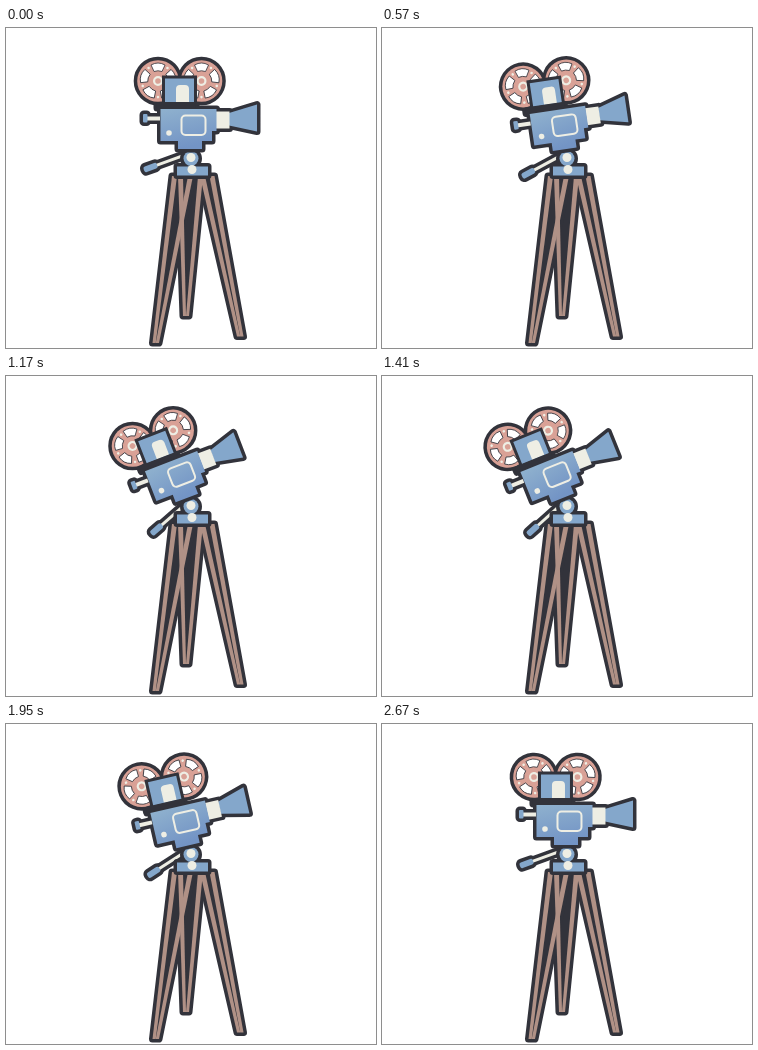
These frames come from a looping animation (370 px wide and 320 px high, 2.7 s). An HTML page:

```html
<!DOCTYPE html>
<html lang="en">
<head>
<meta charset="utf-8">
<title>Film camera</title>
<style>
  html, body { margin: 0; width: 100%; height: 100%; overflow: hidden; background: #fff; }
  svg { display: block; width: 100vw; height: 100vh; }
  .ink { fill: #32333b; }
  .blue { fill: #84a7cb; }
  .shaded { fill: url(#shade); }
  .cream { fill: #eeeee4; }
  .wood { fill: #b09186; }
  .pink { fill: #d9a196; }
  .hole { fill: #fff; stroke: #32333b; stroke-width: .8; }
  .edge { stroke: #32333b; stroke-width: 3; }
  .frame { fill: none; stroke: #eeeee4; stroke-width: 2; }
  .outline * { fill: #32333b; stroke: #32333b; stroke-width: 7; stroke-linejoin: round; }
</style>
</head>
<body>
<svg viewBox="0 0 370 320">
  <linearGradient id="shade" x2=".3" y2="1">
    <stop stop-color="#8fb1ce"/>
    <stop offset="1" stop-color="#7394c5"/>
  </linearGradient>

  <g id="legs"></g>

  <g class="tilt outlined">
    <g transform="rotate(-20 144.500 139.500)">
      <rect class="cream" x="150" y="138" width="30" height="3"/>
      <rect class="blue" x="137.500" y="136.500" width="14" height="6" rx="2"/>
    </g>
  </g>

  <g class="outlined">
    <circle class="blue" cx="185" cy="130.500" r="7.500"/>
    <path class="blue" d="M171 138.500H202V147.500H171Z"/>
  </g>
  <circle class="cream" cx="185" cy="129.500" r="4.500"/>
  <circle class="cream" cx="186" cy="141.500" r="4.500"/>

  <g class="tilt outlined">
    <g class="reel" data-x="152"></g>
    <g class="reel" data-x="195.500"></g>

    <path class="blue edge" d="M157.500 49H189.500V76H157.500Z"/>
    <path class="cream" d="M170 74V61Q170 57 174 57H179Q183 57 183 61V74Z"/>
    <path class="ink" d="M151 74H190V80H151Z"/>

    <path class="cream" d="M140 88.500H154V92.500H140Z"/>
    <rect class="blue" x="137" y="86" width="4.500" height="8.500" rx="1"/>
    <path class="blue" d="M223 85L251 76.500V103.500L223 97.500Z"/>
    <path class="cream" d="M210 83.500H223.500V100.500H210Z"/>
    <path class="shaded" d="M154.500 81H210.500V103H206V113H196V121H172V113H154.500Z"/>
    <rect class="frame" x="175.500" y="87.500" width="24" height="19.500" rx="4"/>
    <circle class="cream" cx="163" cy="105" r="2.800"/>
  </g>
</svg>

<script>
const LOOP = 2700, TILT = -22;
const all = selector => [...document.querySelectorAll(selector)];

// Each leg: left and right edge at the top, then at the foot, then foot height.
const legs = [
  [172, 197, 177, 183, 288],
  [166, 187, 146.5, 153, 315],
  [194, 208.5, 231, 237.5, 308.5]
];
const bar = (a, b, c, d, y, cls) =>
  `<path class="${cls}" d="M${a} 148H${b}L${d} ${y}H${c}Z"/>`;
const silhouette = legs.map(leg => bar(...leg, 'ink')).join('');
const struts = legs.map(([a, b, c, d, y]) => {
  const mid = (c + d) / 2;
  return bar(a, a + 5, c, mid, y, 'wood') + bar(b - 5, b, mid, d, y, 'wood');
}).join('');
document.getElementById('legs').innerHTML = `<g class="outline">${silhouette}</g>${struts}`;

for (const reel of all('.reel')) {
  let parts = '<circle class="pink" r="20.800"/>';
  for (let i = 0; i < 5; i++) {
    parts += `<g transform="rotate(${i * 72})">
      <path class="hole" d="M-7 -16Q0 -20 7 -16L4 -9.500Q0 -11 -4 -9.500Z"/>
      <circle class="cream" r="1.300" cx="9.400" cy="-13"/></g>`;
  }
  reel.innerHTML = parts + '<circle class="cream" r="5"/><circle class="pink" r="2.800"/>';
}

// A thick dark copy behind each part makes its outer contour.
for (const part of all('.outlined')) {
  const copy = part.cloneNode(true);
  copy.classList.add('outline');
  part.before(copy);
}

const tilting = all('.tilt'), reels = all('.reel');
// Keep the reel holes see-through to white: only the disc needs a contour.
for (const hole of all('.outline .hole')) hole.remove();

function draw(now) {
  const phase = (now % LOOP) / LOOP;
  const angle = TILT * (1 - Math.cos(phase * 2 * Math.PI)) / 2;
  for (const part of tilting) part.setAttribute('transform', `rotate(${angle} 185 130)`);
  for (const reel of reels) {
    reel.setAttribute('transform', `translate(${reel.dataset.x} 53) rotate(${phase * 360})`);
  }
  requestAnimationFrame(draw);
}
draw(0);
</script>
</body>
</html>
```
